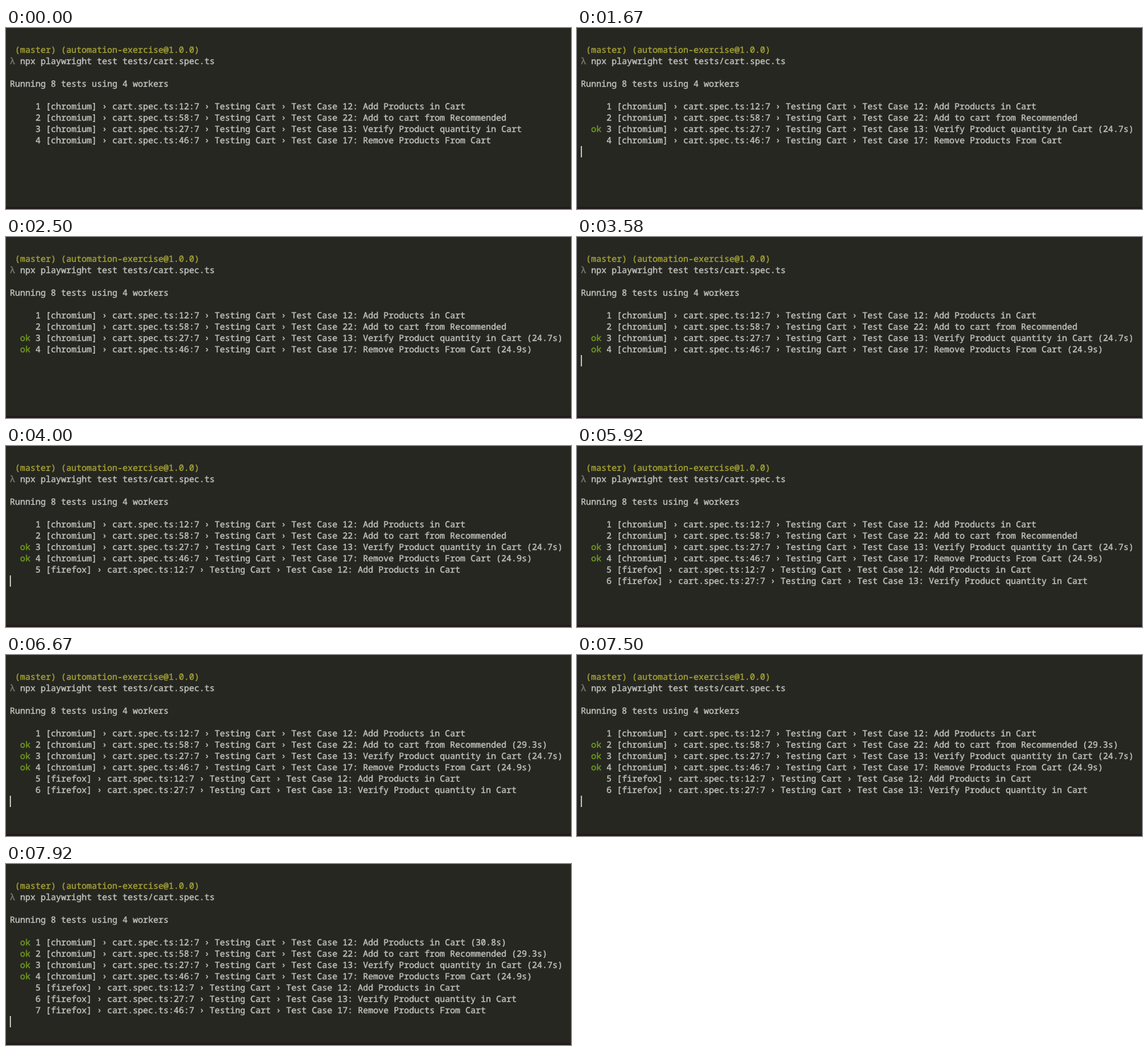
An HTML page with a canvas for the animation above (8 s loop, 800 by 256 pixels).

```html
<!DOCTYPE html>
<html lang="en">
<head>
<meta charset="utf-8">
<title>Terminal test run</title>
<style>
  html, body { margin: 0; width: 100%; height: 100%; overflow: hidden; background: #262721; }
  canvas { display: block; }
</style>
</head>
<body>
<canvas id="stage" width="800" height="256"></canvas>
<script>
const ctx = document.getElementById('stage').getContext('2d');

const LOOP = 8000;
const FRAME = 1000 / 12;
const LEFT = 5.5;
const CELL = 7.25;
const FIRST_BASELINE = 34.5;
const LINE = 16.09;
const COLORS = {
  back: '#262721', edge: '#231a1b', text: '#c6c6c2',
  yellow: '#a7a536', green: '#74a01f', gray: '#7d7d76', cursor: '#d8d8d4'
};

// start: when the line is printed; done: when its result is added
const tests = [
  { browser: 'chromium', line: 12, id: 12, title: 'Add Products in Cart', start: 0, done: 7575, took: '30.8s' },
  { browser: 'chromium', line: 58, id: 22, title: 'Add to cart from Recommended', start: 0, done: 6075, took: '29.3s' },
  { browser: 'chromium', line: 27, id: 13, title: 'Verify Product quantity in Cart', start: 0, done: 1575, took: '24.7s' },
  { browser: 'chromium', line: 46, id: 17, title: 'Remove Products From Cart', start: 0, done: 1825, took: '24.9s' },
  { browser: 'firefox', line: 12, id: 12, title: 'Add Products in Cart', start: 3660 },
  { browser: 'firefox', line: 27, id: 13, title: 'Verify Product quantity in Cart', start: 4075 },
  { browser: 'firefox', line: 46, id: 17, title: 'Remove Products From Cart', start: 7825 }
];
const FIRST_TEST_ROW = 5;

// The cursor first lights up at BLINK_START; every output restarts its blinking.
const BLINK = 600;
const BLINK_START = 75;
const restarts = [BLINK_START, ...tests.flatMap(t => [t.start, t.done]).filter(t => t > 0)];

const baseline = row => FIRST_BASELINE + row * LINE;

function print(text, col, row, color = COLORS.text) {
  const x = LEFT + col * CELL;
  const y = baseline(row);
  ctx.fillStyle = ctx.strokeStyle = color;
  ctx.fillText(text, x, y);
  ctx.strokeText(text, x, y);
}

function cursorVisible(time) {
  if (time < BLINK_START) return false;
  const last = Math.max(...restarts.filter(t => t <= time));
  return Math.floor((time - last) / BLINK) % 2 === 0;
}

function drawTest(test, index, time) {
  const row = FIRST_TEST_ROW + index;
  const done = time >= test.done;
  const result = done ? ` (${test.took})` : '';
  if (done) print('ok', 2, row, COLORS.green);
  print(`${index + 1} [${test.browser}] › cart.spec.ts:${test.line}:7 › Testing Cart › ` +
    `Test Case ${test.id}: ${test.title}${result}`, 5, row);
}

function draw(time) {
  ctx.fillStyle = COLORS.back;
  ctx.fillRect(0, 0, 800, 256);
  ctx.fillStyle = COLORS.edge;
  ctx.fillRect(0, 253, 800, 3);

  ctx.font = `${CELL / 0.6}px "Noto Sans Mono", monospace`;
  ctx.textRendering = 'geometricPrecision';
  ctx.lineWidth = 0.35;
  ctx.lineJoin = 'round';

  print('(master) (automation-exercise@1.0.0)', 1, 0, COLORS.yellow);
  print('λ', 0, 1, COLORS.gray);
  print('npx playwright test tests/cart.spec.ts', 2, 1);
  print('Running 8 tests using 4 workers', 0, 3);

  const shown = tests.filter(t => time >= t.start);
  shown.forEach((test, i) => drawTest(test, i, time));

  if (cursorVisible(time)) {
    ctx.fillStyle = COLORS.cursor;
    ctx.fillRect(LEFT, Math.round(baseline(FIRST_TEST_ROW + shown.length) - 12.5), 1.5, 16);
  }
}

// Time advances in whole frames; the small slack absorbs rounded timestamps.
const frameTime = ms => Math.floor((ms + 5) / FRAME) * FRAME % LOOP;

const begin = performance.now();
function tick() {
  draw(frameTime((performance.now() - begin) % LOOP));
  requestAnimationFrame(tick);
}
tick();
</script>
</body>
</html>
```
